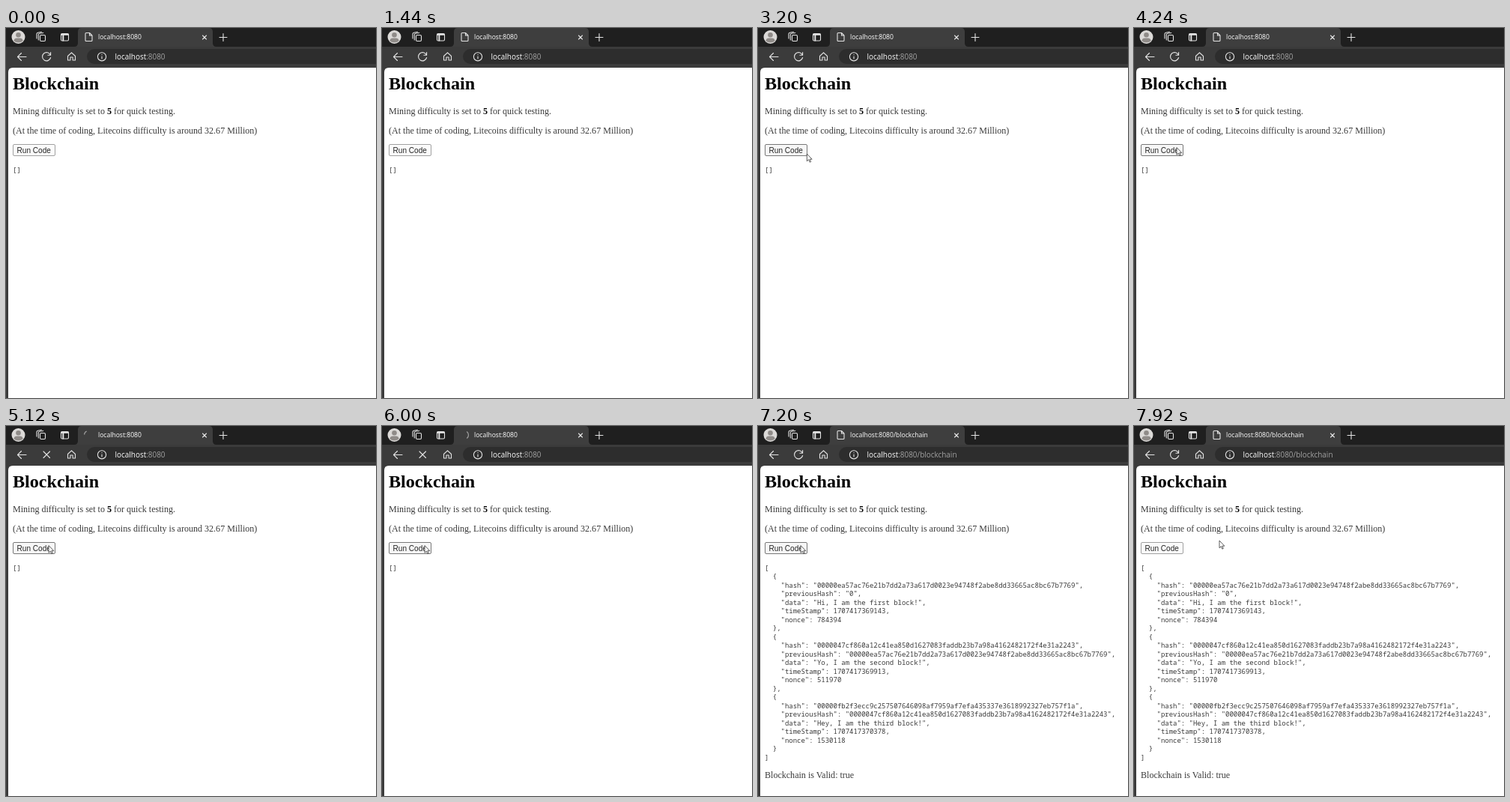
An HTML page that plays this animation: 494 px wide and 494 px high, repeating every 8000 ms.

```html
<!DOCTYPE html>
<html lang="en">
<head>
<meta charset="utf-8">
<title>Blockchain demo</title>
<style>
  html, body { margin: 0; width: 100%; height: 100%; overflow: hidden; background: #fff; }
  svg { display: block; width: 100vw; height: 100vh; }
  .ui { font-family: "Open Sans", "Noto Sans", sans-serif; font-weight: 500; fill: #fff; }
  .page { font: 12.06px "Liberation Serif", serif; fill: #3a3a3a; }
  .mono { font: 8.98px "Noto Sans Mono", "DejaVu Sans Mono", monospace; fill: #3a3a3a; }
  .icon { fill: none; stroke: #e4e4e4; stroke-width: 1.1; stroke-linejoin: round; stroke-linecap: round; }
</style>
</head>
<body>
<svg viewBox="0 0 494 494">
  <!-- browser frame -->
  <rect width="494" height="494" fill="#3b3b3b"/>
  <rect width="494" height="25" fill="#1f1f1f"/>
  <path d="M91 25q5 0 5-5V5q0-5 5-5H271q5 0 5 5v15q0 5 5 5z" fill="#3e3e3e"/>
  <rect x="108" y="28" width="400" height="20" rx="10" fill="#2d2d2d"/>
  <path d="M3 494V59q0-6 6-6H494V494z" fill="#fff"/>

  <!-- tab strip -->
  <circle cx="16.5" cy="12" r="9" fill="#dcdad8"/>
  <circle cx="16.5" cy="9.3" r="3.3" fill="#8f8b88"/>
  <path d="M10.5 17.5q0-4 4-4h4q4 0 4 4q-6 4-12 0z" fill="#8f8b88"/>
  <g class="icon">
    <rect x="45.500" y="9.500" width="7" height="8" rx="1.500"/>
    <path d="M43.300 16V9q0-1.500 1.500-1.700l5-.8M41 14V8q0-1.500 1.500-1.800l5-.9"/>
    <rect x="73.500" y="7.500" width="10" height="9.500" rx="1.500"/>
    <path d="M74 8.700h9M76.300 9v7.500" stroke-width="2"/>
    <path id="doc" d="M107 6.500h4.500l3.500 3.500v6.500q0 1-1 1h-7q-1 0-1-1v-9q0-1 1-1zM111.500 6.500v3.500h3.500"/>
    <path d="M262.500 10l5 5m0-5l-5 5M285 12.500h10M290 7.500v10"/>
    <!-- toolbar -->
    <path d="M27 38.500H15.500l5-5m-5 5l5 5"/>
    <path id="reload" d="M59.300 36a5.600 5.600 0 1 0 .3 3.500M59.600 32.500v3.700h-3.700"/>
    <path id="stop" d="M50 34l8.500 8.500m0-8.500l-8.500 8.500"/>
    <path d="M82.500 37.500l5-4.700 5 4.700v5.500h-3.400v-4h-3.200v4h-3.400z"/>
    <circle cx="128" cy="38.300" r="5.600"/>
    <path d="M128 38v3M128 35.600v.1"/>
  </g>
  <path id="spinner" fill="none" stroke="#a0a0a0" stroke-width="1.2"/>
  <text class="ui" id="title" x="123" y="15.300" font-size="8.6"></text>
  <text class="ui" x="145.500" y="42" font-size="9.950">localhost<tspan id="path" fill="#a2a2a2" font-weight="400"></tspan></text>

  <!-- page -->
  <g class="page">
    <text x="9" y="81.500" font-size="24.1" font-weight="bold" fill="#000">Blockchain</text>
    <text x="9" y="115">Mining difficulty is set to <tspan font-weight="bold" fill="#000">5</tspan> for quick testing.</text>
    <text x="9" y="141">(At the time of coding, Litecoins difficulty is around 32.67 Million)</text>
  </g>
  <rect id="button" x="9.500" y="155.500" width="56" height="15" rx="1.500"/>
  <text x="14.600" y="166.700" font-family="Liberation Sans, sans-serif" font-size="10.050" fill="#222">Run Code</text>
  <text class="mono" id="empty" x="9" y="192.500">[]</text>
  <g id="result">
    <g class="mono" id="json"></g>
    <text class="page" x="9" y="470">Blockchain is Valid: true</text>
  </g>

  <path id="cursor" d="M0 0V9.800l2.300-2.100 1.500 3.500 1.500-.7-1.500-3.300h3z" fill="#fff" stroke="#333" stroke-width=".8"/>
</svg>
<script>
const $ = id => document.getElementById(id);
const show = (id, on) => $(id).setAttribute('display', on ? 'inline' : 'none');

const LOOP = 8000, STEP = 80, ENTER = 2240, CLICK = 4400, DONE = 7040;

// Cursor path: time, x, y
const KEYS = [
  [2240, 487, 456], [2560, 186, 352], [2800, 122, 250], [3040, 82, 185],
  [3280, 57, 159.500], [7400, 57, 159.500], [7880, 114, 153], [8000, 114, 153]
];

const blocks = [
  ['00000ea57ac76e21b7dd2a73a617d0023e94748f2abe8dd33665ac8bc67b7769', 'Hi, I am the first block!', 1707417369143, 784394],
  ['0000047cf860a12c41ea850d1627083faddb23b7a98a4162482172f4e31a2243', 'Yo, I am the second block!', 1707417369913, 511970],
  ['00000fb2f3ecc9c257507646098af7959af7efa435337e3618992327eb757f1a', 'Hey, I am the third block!', 1707417370378, 1530118]
];
const chain = blocks.map(([hash, data, timeStamp, nonce], i) =>
  ({ hash, previousHash: i ? blocks[i - 1][0] : '0', data, timeStamp, nonce }));

JSON.stringify(chain, null, 2).split('\n').forEach((line, i) => {
  const text = document.createElementNS('http://www.w3.org/2000/svg', 'text');
  text.textContent = line.trim();
  text.setAttribute('x', 9 + 5.390 * line.search(/\S/));
  text.setAttribute('y', 192.800 + 11.490 * i);
  $('json').append(text);
});

function cursorAt(t) {
  const i = Math.max(1, KEYS.findIndex(k => k[0] > t));
  const [t0, x0, y0] = KEYS[i - 1], [t1, x1, y1] = KEYS[i];
  const p = (t - t0) / (t1 - t0);
  return [x0 + (x1 - x0) * p, y0 + (y1 - y0) * p];
}

// Arc turning counterclockwise while its length breathes
function spinnerArc(t) {
  const point = deg => {
    const a = deg * Math.PI / 180;
    return `${110 + 5.500 * Math.cos(a)} ${12 + 5.500 * Math.sin(a)}`;
  };
  const start = 185 - 360 * (t - 5120) / 1320;
  const sweep = 105 - 45 * Math.cos(2 * Math.PI * (t - 5120) / 3360);
  return `M${point(start)}A5.500 5.500 0 0 1 ${point(start + sweep)}`;
}

const begin = performance.now();

function draw() {
  const t = Math.floor((performance.now() - begin) % LOOP / STEP) * STEP;
  const loading = t >= CLICK && t < DONE, done = t >= DONE;
  const [x, y] = cursorAt(t);
  const hover = t >= ENTER && x >= 9 && x < 66 && y >= 155 && y < 171;

  show('doc', !loading);
  show('reload', !loading);
  show('stop', loading);
  show('spinner', loading);
  show('empty', !done);
  show('result', done);
  show('cursor', t >= ENTER);

  const path = ':8080' + (done ? '/blockchain' : '');
  $('title').textContent = 'localhost' + path;
  $('path').textContent = path;
  $('spinner').setAttribute('d', spinnerArc(t));
  $('button').setAttribute('fill', hover ? '#f7f7f7' : '#fbfbfb');
  $('button').setAttribute('stroke', hover ? '#777' : '#a0a0a0');
  $('cursor').setAttribute('transform', `translate(${x} ${y})`);
  requestAnimationFrame(draw);
}
draw();
</script>
</body>
</html>
```
